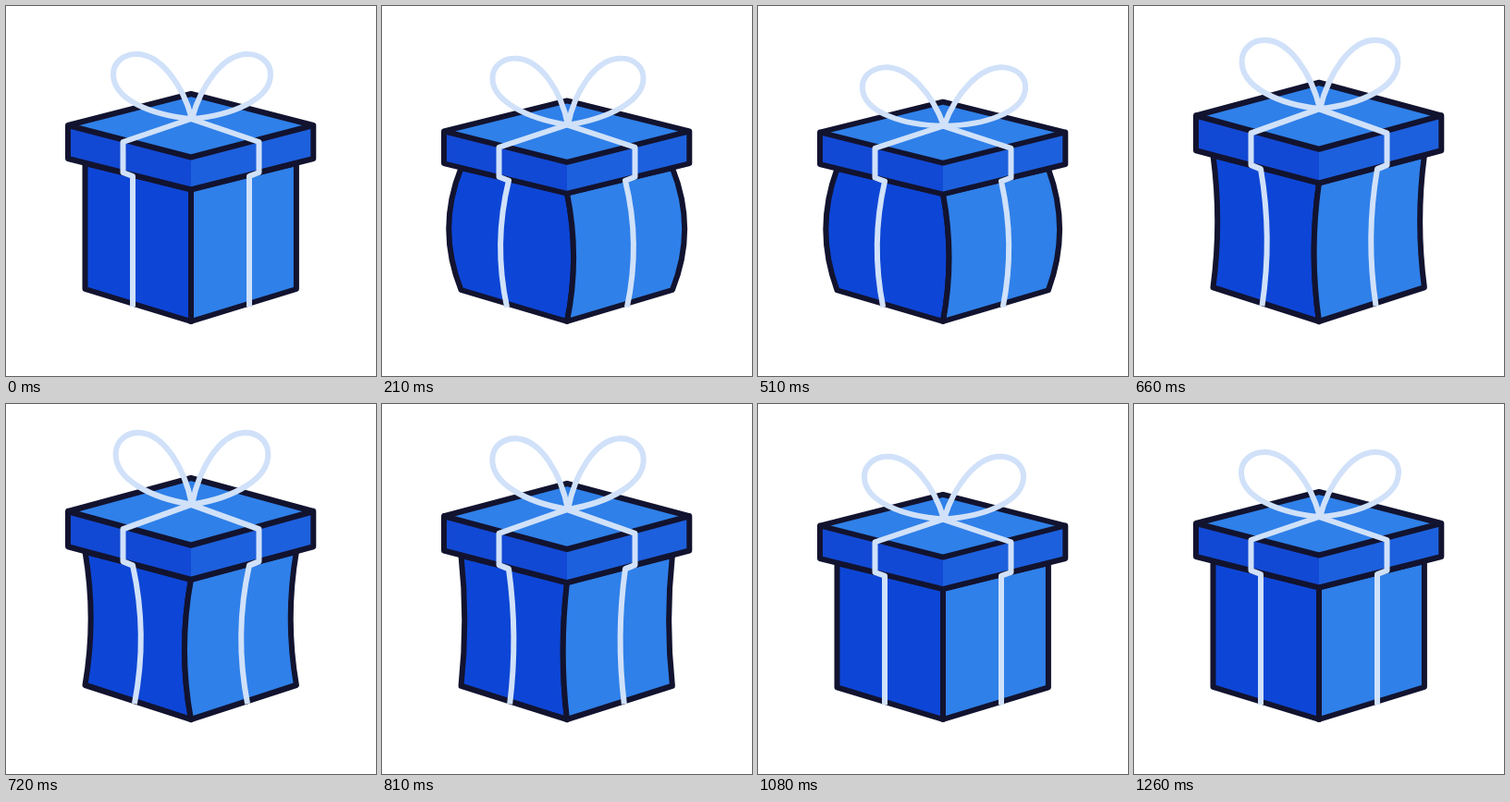
Write an HTML page that moves like this. It is 400 px wide and 400 px high and loops after 3.32 s.

```html
<!DOCTYPE html>
<html lang="en">
<head>
<meta charset="utf-8">
<title>Gift box</title>
<style>
  html, body { margin: 0; height: 100%; overflow: hidden; background: #fff; }
  svg { display: block; width: 100vw; height: 100vh; }
  .edge { stroke: #12132f; stroke-width: 6; stroke-linejoin: round; stroke-linecap: round; }
  .ribbon { fill: none; stroke: #d0e1f9; stroke-width: 6; stroke-linejoin: round; }
</style>
</head>
<body>
<svg viewBox="0 0 400 400">
  <g id="box">
    <path id="left" class="edge" fill="#0d46d6"/>
    <path id="right" class="edge" fill="#2f80e9"/>
    <path fill="#1249d4" d="M67 129L200 163.5V198.5L67 165Z"/>
    <path fill="#1d60dd" d="M332.3 129L200 163.5V198.5L332.3 165Z"/>
    <path fill="#2f80e9" d="M67 129L200 95L332.3 129L200 163.5Z"/>
    <path class="edge" fill="none" d="M67 129L200 95L332.3 129V165L200 198.5L67 165ZL200 163.5L332.3 129"/>
    <path id="band" class="ribbon"/>
    <g class="ribbon">
      <path id="loopL" d="M201 122C191 85 167 52 141 52C127 52 116 61 116 74C116 101 157 118 201 122"/>
      <path id="loopR" d="M201 122C211 85 235 52 261 52C275 52 286 61 286 74C286 101 245 118 201 122"/>
    </g>
  </g>
</svg>
<script>
const STEP = 30, LOOP = 3320, LAST = 42;
const $ = id => document.getElementById(id);
const inOut = u => (1 - Math.cos(Math.PI * u)) / 2;
const out = u => Math.sin(Math.PI * u / 2);

// Keys are [step, value, easing into this key].
const squash = [[0, 1], [14, .94], [24, 1.061], [32, .982], [42, 1]];
const bulge = [[0, 0], [14, 13.6, out], [24, -9.5], [31, 0], [42, 0]];
const swing = [[0, 0], [7, 4], [17, -4], [26, 4], [34, -1.5], [42, 0]];

function at(keys, n) {
  const i = Math.max(1, keys.findIndex(k => k[0] >= n));
  const [a, from] = keys[i - 1], [b, to, ease = inOut] = keys[i];
  return from + (to - from) * ease((n - a) / (b - a));
}

function face(dir, side, mid) {
  const x = 199.7 + dir * 114.2;
  return `M${x} 170Q${x + dir * 2 * side} 238 ${x} 306L200 341Q${200 + 2 * mid} 270 200 198Z`;
}

function draw(n) {
  const b = at(bulge, n), angle = at(swing, n);
  const side = b * (b > 0 ? 1.38 : .65), mid = b * .74;
  $('left').setAttribute('d', face(-1, side, mid));
  $('right').setAttribute('d', face(1, side, mid));

  const foot = 63 + .2 * b, belly = 63 + 1.75 * b;
  $('band').setAttribute('d',
    `M${200 - foot} 325Q${200 - belly} 254 137 184L126.5 180V147L200 122` +
    `L273.5 147V180L263 184Q${200 + belly} 254 ${200 + foot} 325`);

  $('loopL').setAttribute('transform', `rotate(${angle} 201 122)`);
  $('loopR').setAttribute('transform', `rotate(${-angle} 201 122)`);
  $('box').setAttribute('transform', `translate(0 341) scale(1 ${at(squash, n)}) translate(0 -341)`);
}

const start = performance.now();
function tick() {
  const t = (performance.now() - start) % LOOP;
  draw(Math.min(LAST, Math.floor(t / STEP)));
  requestAnimationFrame(tick);
}
tick();
</script>
</body>
</html>
```
